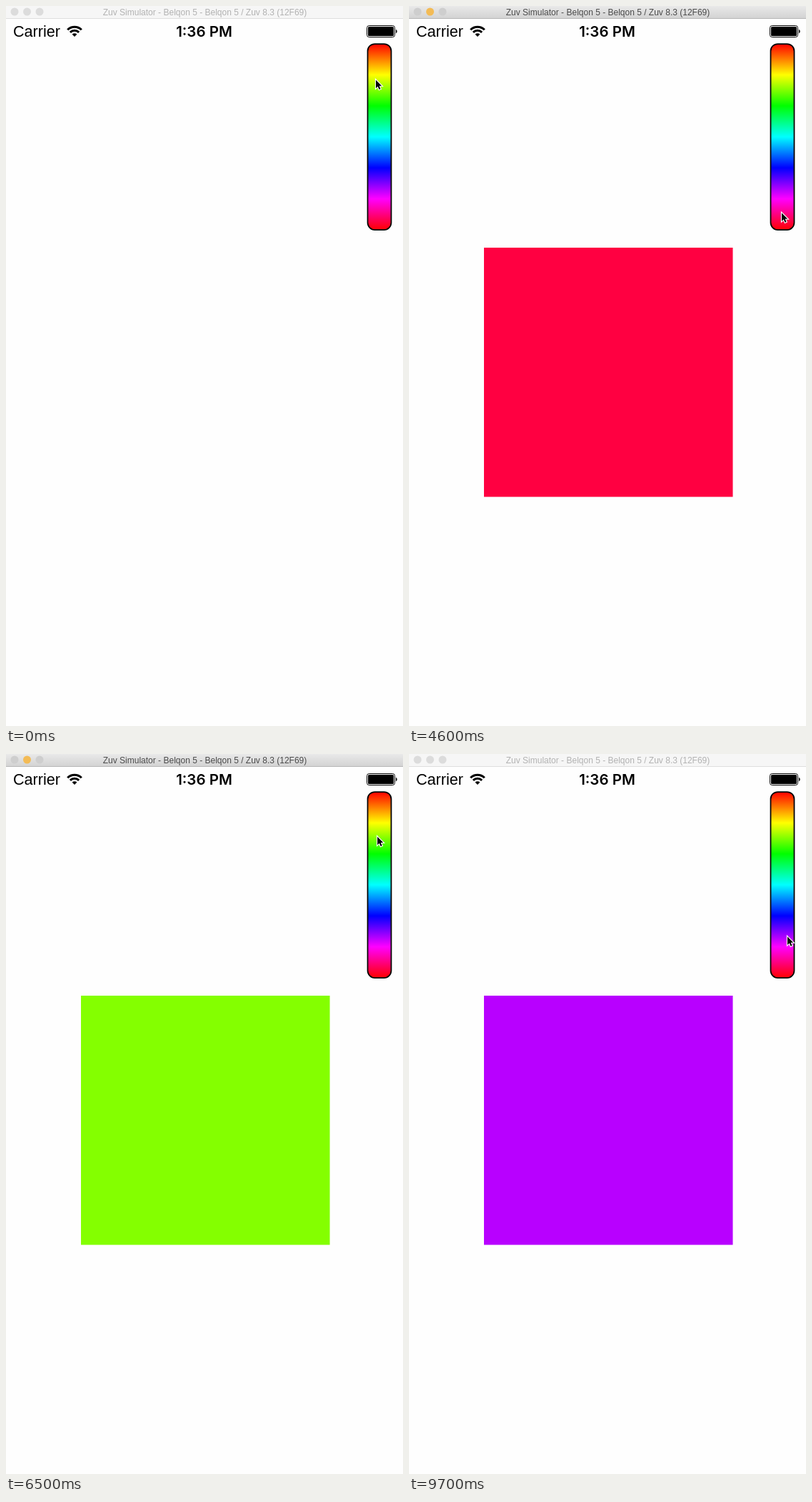
An HTML page that plays this animation: 556 px wide and 1007 px high, repeating every 9.8 s.

```html
<!DOCTYPE html>
<html>
<head>
<meta charset="utf-8">
<style>
  html, body { margin: 0; height: 100%; overflow: hidden; background: #fefefe; }
  svg { display: block; width: 556px; height: 1007px; font-family: "Liberation Sans", Arial, sans-serif; }
  .clock { font: 600 20.5px Inter, sans-serif; }
</style>
</head>
<body>
<svg viewBox="0 0 556 1007">
  <defs>
    <linearGradient id="hues" x2="0" y2="1">
      <stop stop-color="#f00"/>
      <stop offset=".1667" stop-color="#ff0"/>
      <stop offset=".3333" stop-color="#0f0"/>
      <stop offset=".5" stop-color="#0ff"/>
      <stop offset=".6667" stop-color="#00f"/>
      <stop offset=".8333" stop-color="#f0f"/>
      <stop offset="1" stop-color="#f00"/>
    </linearGradient>
    <linearGradient id="chrome" x2="0" y2="1">
      <stop stop-color="#e9e9e9"/>
      <stop offset="1" stop-color="#d3d3d3"/>
    </linearGradient>
  </defs>

  <rect id="titleBar" width="556" height="17"/>
  <path id="divider" d="M0 17.5H556"/>
  <g id="lights">
    <circle cx="12" cy="8" r="5.5"/>
    <circle cx="29.5" cy="8" r="5.5"/>
    <circle cx="47" cy="8" r="5.5"/>
  </g>
  <text id="title" x="278.5" y="12.5" font-size="12" text-anchor="middle">Zuv Simulator - Belqon 5 - Belqon 5 / Zuv 8.3 (12F69)</text>

  <text x="10" y="43" font-size="21.6">Carrier</text>
  <g fill="none" stroke="#000" stroke-width="3">
    <path d="M86.2 33.2A13.9 13.9 0 0 1 105.8 33.2M89.9 36.9A8.6 8.6 0 0 1 102.1 36.9"/>
    <path d="M96 43L92.6 39.6A4.8 4.8 0 0 1 99.4 39.6Z" fill="#000" stroke="none"/>
  </g>
  <text class="clock" x="277.5" y="43" text-anchor="middle">1:36 PM</text>
  <rect x="505.5" y="27.5" width="39" height="16" rx="3" fill="none" stroke="#000"/>
  <rect x="507" y="29" width="36" height="13" rx="1.5"/>
  <path d="M546 32.5Q549.5 35.5 546 38.5Z"/>

  <rect x="506.5" y="53" width="33" height="260" rx="10" fill="url(#hues)" stroke="#000" stroke-width="1.75"/>
  <rect id="swatch" x="105" y="338" width="348.5" height="348.5"/>
  <path id="cursor" d="M1 1.5v11.5l2.7-2.5 1.9 4.3 2-.9-1.9-4.2h3.5z" stroke="#fff" stroke-width="2.2" paint-order="stroke"/>
</svg>
<script>
const LOOP = 9800, STEP = 100, MAX_TRAVEL = 1180;
const ACTIVE_FROM = 500, ACTIVE_TO = 9200;
const BAR_TOP = 53, BAR_HEIGHT = 260, TIP_OFFSET = 3;

// Places the pointer reaches: arrival time, x, y
const stops = [
  [0, 517, 102], [1300, 522, 262], [1900, 524, 140], [2400, 531, 201],
  [3200, 525, 120], [4200, 518, 299], [4600, 521, 288], [5400, 513, 203],
  [6000, 518, 91], [7400, 526, 254.6], [8200, 521, 285], [9700, 529, 254]
];
// Spans in which the button is held on the colour bar
const drags = [[600, 1900], [2500, 4200], [4800, 7400]];

const el = id => document.getElementById(id);
const paint = (id, name, value) => el(id).setAttribute(name, value);

function pointerAt(t) {
  const i = stops.findIndex(s => s[0] > t);
  if (i < 0) return stops.at(-1).slice(1);
  const [left, x0, y0] = stops[i - 1], [arrive, x1, y1] = stops[i];
  const start = Math.max(left, arrive - MAX_TRAVEL);
  const u = Math.max(0, (t - start) / (arrive - start));
  const k = u * u * (3 - 2 * u);
  return [x0 + (x1 - x0) * k, y0 + (y1 - y0) * k];
}

function hueAt(t) {
  const drag = drags.findLast(d => d[0] <= t);
  const y = pointerAt(Math.min(t, drag[1]))[1] + TIP_OFFSET;
  return (y - BAR_TOP) / BAR_HEIGHT * 360;
}

function draw(now) {
  const t = Math.floor(now % LOOP / STEP) * STEP;
  const active = t >= ACTIVE_FROM && t < ACTIVE_TO;

  paint("titleBar", "fill", active ? "url(#chrome)" : "#f6f6f6");
  paint("divider", "stroke", active ? "#b8b8b8" : "#dedede");
  paint("title", "fill", active ? "#4a4a4a" : "#b2b2b2");
  paint("lights", "fill", active ? "#cecece" : "#dcdcdc");
  el("lights").children[1].setAttribute("fill", active ? "#f3bb55" : "#dcdcdc");

  const shown = t >= drags[0][0];
  paint("swatch", "fill", shown ? `hsl(${hueAt(t)} 100% 50%)` : "none");
  paint("cursor", "transform", `translate(${pointerAt(t)})`);
  requestAnimationFrame(draw);
}
requestAnimationFrame(draw);
</script>
</body>
</html>
```
